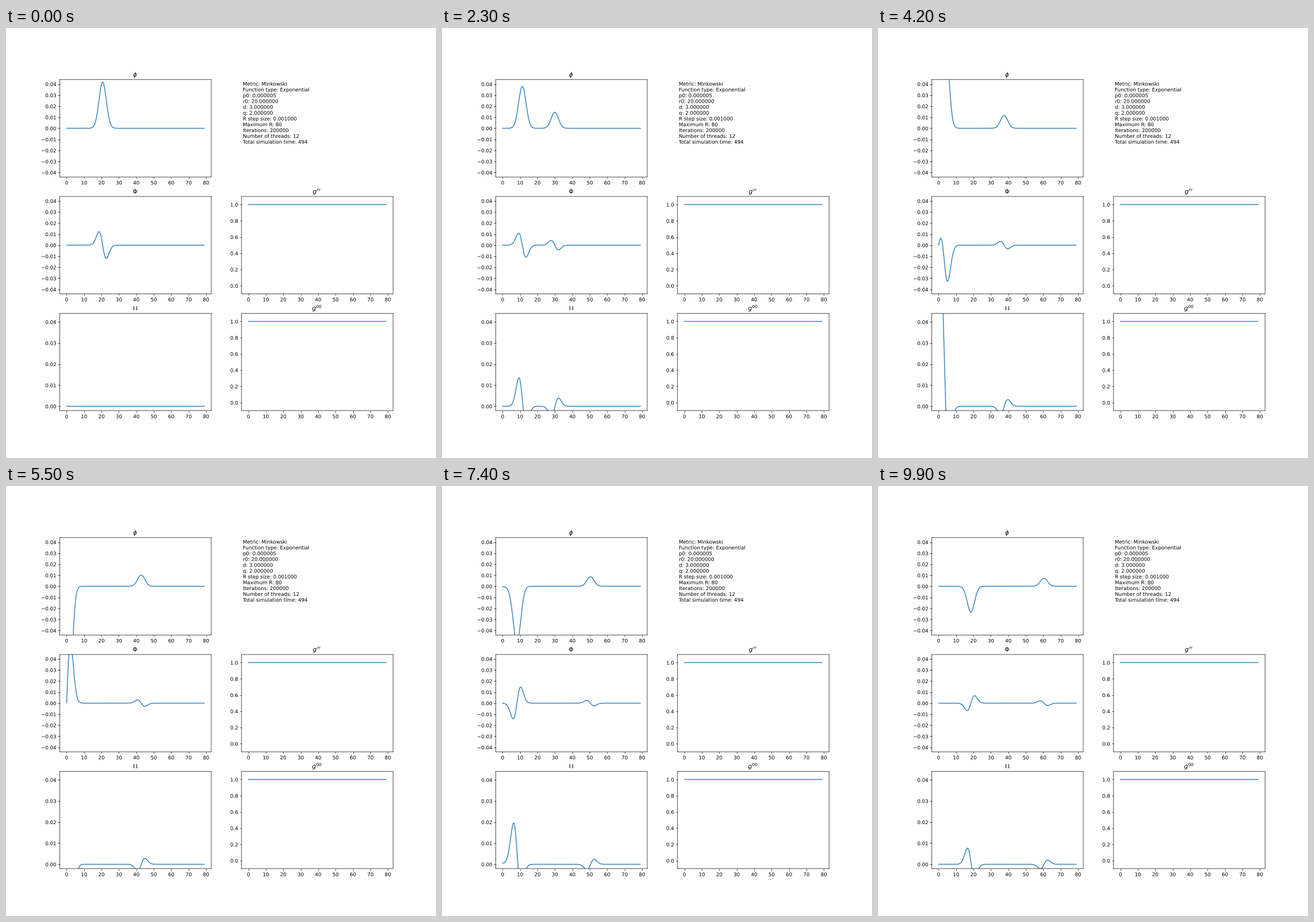
These frames come from a looping animation (748x748 px, 10000 ms). A matplotlib script:

```python
import numpy as np
import matplotlib.pyplot as plt
from matplotlib import patheffects
from matplotlib.animation import FuncAnimation
from matplotlib.ticker import MultipleLocator

SIZE, INCHES = 748, 12
FRAMES, INTERVAL = 100, 100
DT = 0.4                          # simulated time per frame
P0, R0, D = 5e-6, 20.0, 3.0       # initial pulse
R = np.linspace(0, 79, 317)
R_SAFE = np.maximum(R, 1e-3)      # avoids dividing by zero at the centre

INFO = [
    "Metric: Minkowski",
    "Function type: Exponential",
    "p0: 0.000005",
    "r0: 20.000000",
    "d: 3.000000",
    "q: 2.000000",
    "R step size: 0.001000",
    "Maximum R: 80",
    "Iterations: 200000",
    "Number of threads: 12",
    "Total simulation time: 494",
]

plt.rcParams.update({
    "font.family": "DejaVu Sans",
    "path.snap": False,                        # keep sub-pixel line positions
    "path.effects": [patheffects.Normal()],    # draw text as smooth outlines
})


def pulse(x):
    """r * phi at t = 0, extended as an odd function."""
    a = np.abs(x)
    return P0 * x * a**3 * np.exp(-((a - R0) / D) ** 2)


def pulse_slope(x):
    a = np.abs(x)
    rise = 4 * a**3 - 2 * a**4 * (a - R0) / D**2
    return P0 * rise * np.exp(-((a - R0) / D) ** 2)


def fields(t):
    """Exact spherical wave: phi, its radial and its time derivative."""
    r = R_SAFE
    ingoing, outgoing = pulse_slope(r + t), pulse_slope(r - t)
    phi = (pulse(r + t) + pulse(r - t)) / (2 * r)
    d_r = (ingoing + outgoing) / (2 * r) - phi / r
    d_t = (ingoing - outgoing) / (2 * r)
    return phi, d_r, d_t


def panel(slot, title, ylim, step):
    ax = fig.add_subplot(3, 2, slot)
    line, = ax.plot(R, np.ones_like(R))
    ax.set_title(title)
    ax.set_ylim(*ylim)
    ax.xaxis.set_major_locator(MultipleLocator(10))
    ax.yaxis.set_major_locator(MultipleLocator(step))
    return line


fig = plt.figure(figsize=(INCHES, INCHES), dpi=SIZE / INCHES, facecolor="white")

peak = fields(0)[0].max()
top = 1.05 * peak
lines = [
    panel(1, r"$\phi$", (-top, top), 0.01),
    panel(3, r"$\Phi$", (-top, top), 0.01),
    panel(5, r"$\Pi$", (-0.05 * peak, top), 0.01),
]
panel(4, "$g^{rr}$", (-0.1, 1.1), 0.2)
panel(6, "$g^{00}$", (-0.1, 1.1), 0.2)

for i, text in enumerate(INFO):
    y = 100.2 + 10.1 * i
    fig.text(412 / SIZE, 1 - y / SIZE, text, fontsize=10, va="baseline")


def update(frame):
    for line, values in zip(lines, fields(frame * DT)):
        line.set_ydata(values)
    return lines


anim = FuncAnimation(fig, update, frames=FRAMES, interval=INTERVAL,
                     init_func=lambda: update(0), repeat=True, repeat_delay=0)
plt.show()
```
